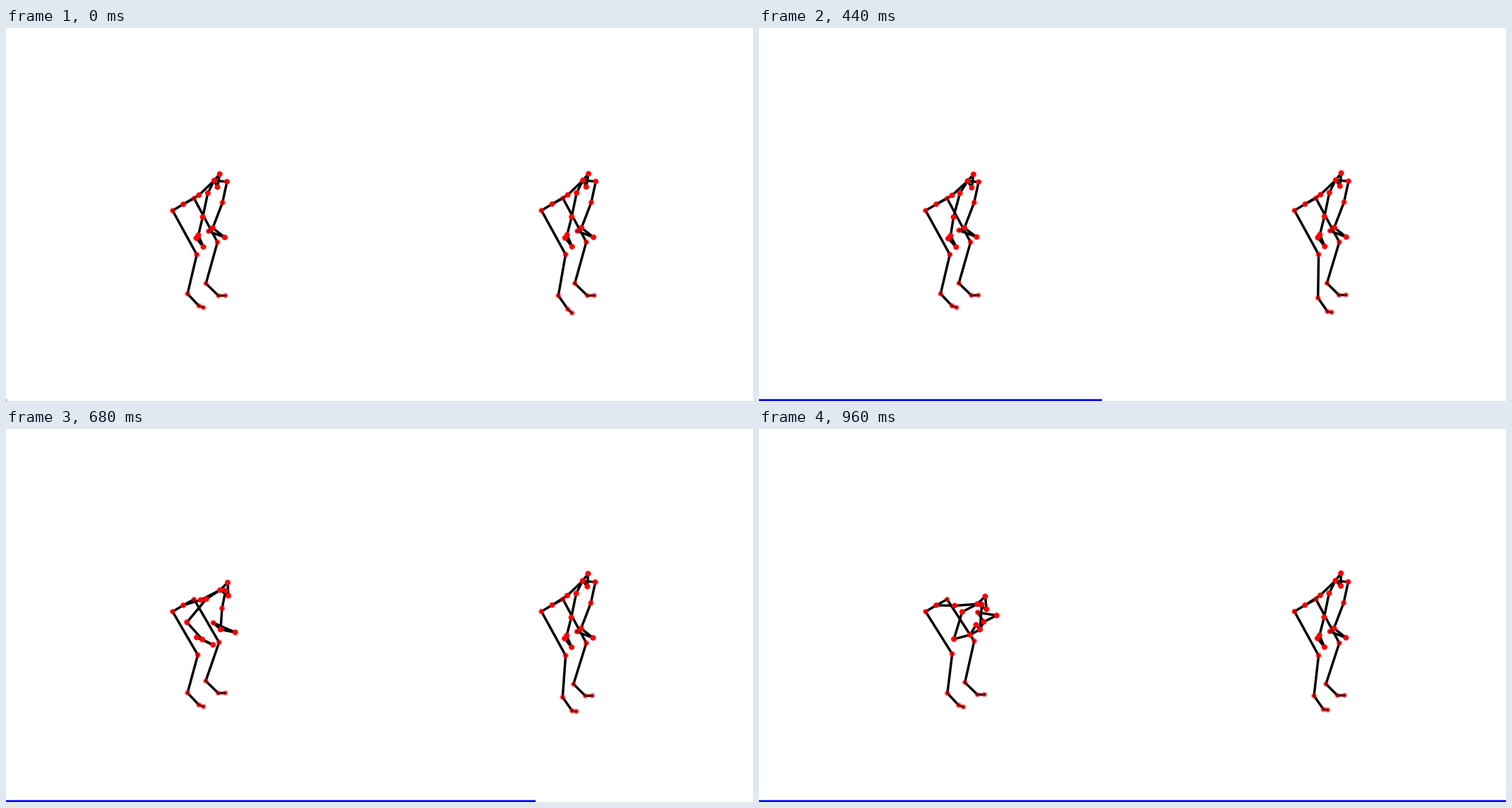
These frames come from a looping animation (1058x529 px, 1000 ms). A matplotlib script:

```python
import numpy as np
import matplotlib.pyplot as plt
from matplotlib.animation import FuncAnimation
from matplotlib.collections import LineCollection
from matplotlib.patches import Rectangle

W, H, DPI = 1058, 529, 100
FRAMES, INTERVAL = 25, 40
PELVIS = 251 + 250j
SHIFT = 522.4  # distance between the two figures

# Joint: parent, bone vector from the parent (y down), dot opacity
SKELETON = {
    "pelvis": (None, 0, 0.85),
    "hip_l": ("pelvis", -15 + 9j, 0.65),
    "knee_l": ("hip_l", 34.2 + 62.4j, 0.68),
    "ankle_l": ("knee_l", -13.1 + 55.6j, 0.5),
    "foot_l": ("ankle_l", 16.1 + 17.1j, 0.46),
    "toe_l": ("foot_l", 6.5 + 2.4j, 0.44),
    "hip_r": ("pelvis", 15.4 - 8.4j, 0.5),
    "knee_r": ("hip_r", 33.1 + 62.2j, 0.6),
    "ankle_r": ("knee_r", -16.3 + 58.6j, 0.43),
    "foot_r": ("ankle_r", 17.7 + 17.3j, 0.4),
    "toe_r": ("foot_r", 10 - 0.2j, 0.38),
    "spine": ("pelvis", 22.2 - 13j, 0.9),
    "neck": ("spine", 21.6 - 20.8j, 1),
    "crown": ("neck", 7.8 - 9.2j, 1),
    "nose": ("neck", 4.6 + 9.4j, 1),
    "shoulder_l": ("neck", -9 + 17.8j, 1),
    "elbow_l": ("shoulder_l", -7 + 34j, 1),
    "wrist_l": ("elbow_l", -6.5 + 25.7j, 1),
    "tip_l": ("wrist_l", 7 + 16.6j, 1),
    "thumb_l": ("wrist_l", -2.9 + 4.2j, 1),
    "shoulder_r": ("neck", 18.1 + 1.7j, 0.88),
    "elbow_r": ("shoulder_r", -6.4 + 29.7j, 0.72),
    "wrist_r": ("elbow_r", -13.8 + 36j, 1),
    "tip_r": ("wrist_r", 17 + 13.4j, 1),
    "thumb_r": ("wrist_r", -5.9 + 4.6j, 0.65),
}
NAMES = list(SKELETON)
BONES = [(row[0], name) for name, row in SKELETON.items() if row[0]]
BONES += [("crown", "nose"), ("tip_l", "thumb_l"), ("tip_r", "thumb_r")]

# Bow: timing, final bone vector, extra swing halfway through
BOW = {
    "knee_l": ("even", 37.6 + 60j, 0),
    "ankle_l": ("late", -7 + 55.6j, -6 - 5j),
    "knee_r": ("even", 38.4 + 59.2j, 0),
    "ankle_r": ("even", -13.2 + 58.6j, -4 - 4j),
    "spine": ("even", 26 + 0.5j, 0),
    "neck": ("even", 32 - 2.3j, 0),
    "crown": ("early", 11.4 - 11j, 0),
    "nose": ("early", 13.2 + 7.3j, 0),
    "shoulder_l": ("early", -21.2 + 11j, 0),
    "elbow_l": ("even", -12 + 38.6j, -19 - 3j),
    "wrist_l": ("even", 23 - 5.8j, 7 + 4j),
    "tip_l": ("even", 14 - 7.4j, 0),
    "thumb_l": ("even", 8.4 - 14.2j, 0),
    "shoulder_r": ("early", 6.6 + 0.6j, 0),
    "elbow_r": ("even", -2.6 + 35.2j, -7j),
    "wrist_r": ("late", 5.5 - 11j, -5 - 10j),
    "tip_r": ("even", 18.3 - 9j, 0),
    "thumb_r": ("early", -8.5 - 13.4j, 0),
}

# Slow drift of the second figure over the loop
DRIFT = {"spine": -0.8 - 0.8j, "crown": -1.5j, "nose": 3 - 2j,
         "ankle_r": -2.6 - 0.6j, "foot_r": -1.4 - 1j}


def chain(root, bones):
    """Add up the bone vectors from the root outwards."""
    spots = {}
    for name, (parent, _, _) in SKELETON.items():
        spots[name] = spots[parent] + bones[name] if parent else root
    return spots


def rest():
    return {name: row[1] for name, row in SKELETON.items()}


def bowing(i):
    x = (i - 12) / 12
    even = (x + np.hypot(x, 0.12)) / 2  # straight ramp with a soft start
    u = np.clip((i - 8) / 12, 0, 1)
    pace = {"even": even, "late": even**2.5, "early": u * u * (3 - 2 * u)}
    bones = rest()
    for name, (timing, end, swing) in BOW.items():
        s = pace[timing]
        # a complex power turns and stretches the bone together
        bones[name] *= (end / bones[name]) ** s
        bones[name] += swing * np.sin(np.pi * s)
    return chain(PELVIS, bones)


def stepping(i):
    t = i / (FRAMES - 1)
    bones = rest()
    for name, move in DRIFT.items():
        bones[name] += move * t
    kick = i / 6 * np.exp(1 - i / 6)  # quick swing, slow return
    bones["ankle_l"] = -10.3 + 58.3j + (10.9 + 5.4j) * kick + (1.6 - 2.2j) * t
    bones["foot_l"] = 13.4 + 19.3j
    bones["toe_l"] = 6 + 1j * (0.8 + 4.6 * np.exp(-6 * t))
    return chain(PELVIS + SHIFT - 0.2j, bones)


fig = plt.figure(figsize=(W / DPI, H / DPI), dpi=DPI, facecolor="white")
ax = fig.add_axes([0, 0, 1, 1])
ax.set_xlim(0, W)
ax.set_ylim(H, 0)
ax.axis("off")

figures = []
for motion in (bowing, stepping):
    lines = ax.add_collection(LineCollection(
        [], colors="black", linewidths=2.5, capstyle="projecting", zorder=2))
    dots = ax.scatter(np.zeros(len(NAMES)), np.zeros(len(NAMES)), s=18,
                      c=[(1, 0, 0, row[2]) for row in SKELETON.values()],
                      edgecolors="face", linewidths=1.5, zorder=3)
    figures.append((motion, lines, dots))

bar = ax.add_patch(Rectangle((0, H - 2.7), 0.7, 2.7, fc="blue", lw=0, snap=False))


def draw(i):
    for motion, lines, dots in figures:
        spots = {name: (z.real, z.imag) for name, z in motion(i).items()}
        lines.set_segments([(spots[a], spots[b]) for a, b in BONES])
        dots.set_offsets([spots[name] for name in NAMES])
    bar.set_width(W * i / (FRAMES - 1) + 0.7)
    return [bar] + [part for _, *parts in figures for part in parts]


anim = FuncAnimation(fig, draw, frames=FRAMES, interval=INTERVAL,
                     repeat=True, repeat_delay=0)
plt.show()
```
